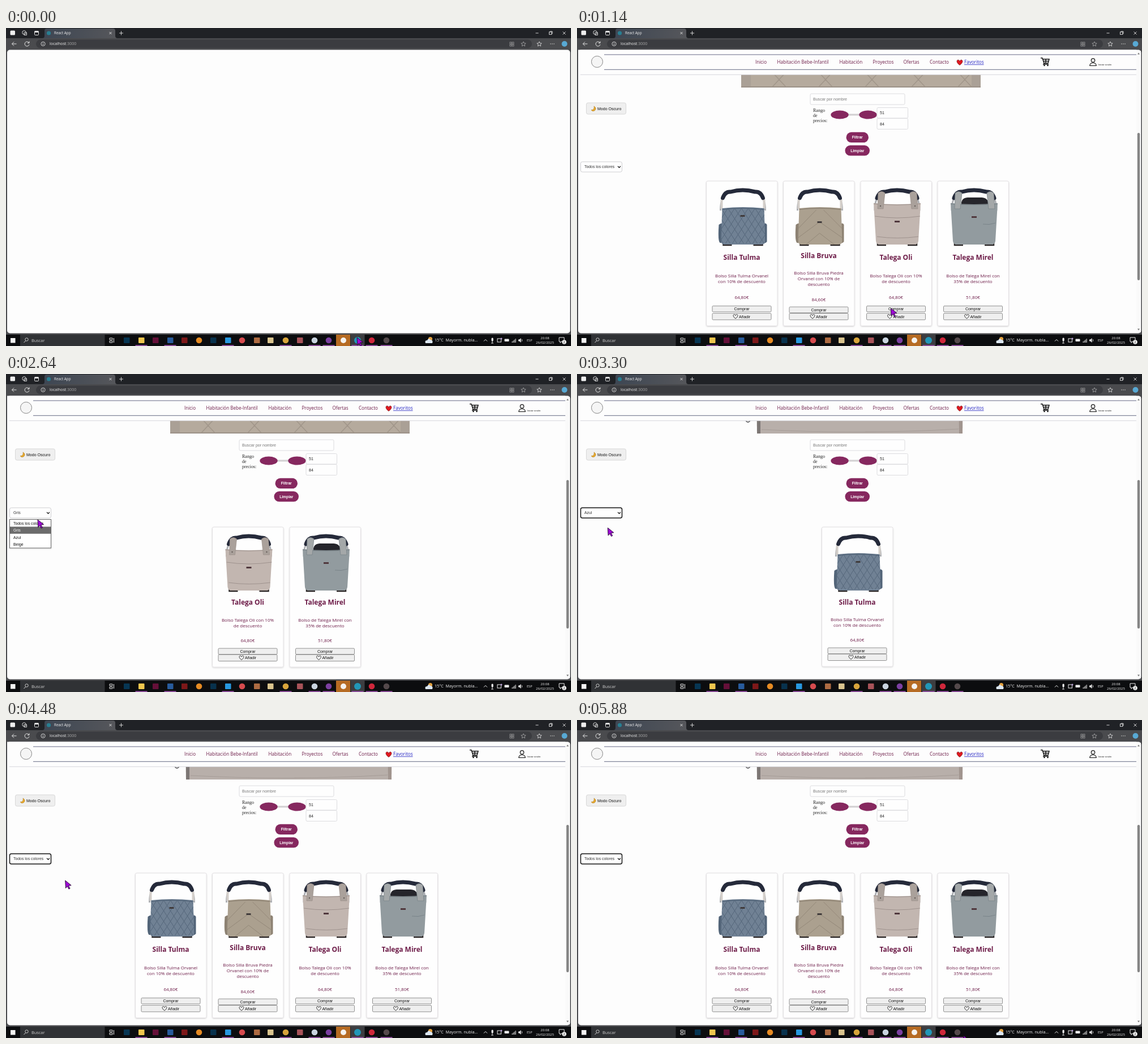
Recreate the animation shown at these times as an HTML page. Size 998x561 px, loop 5900 ms.

```html
<!DOCTYPE html>
<html lang="es">
<head>
<meta charset="utf-8">
<title>Tienda</title>
<style>
html, body { margin: 0; width: 100%; height: 100%; overflow: hidden; background: #4a4b4e; }
svg { display: block; width: 998px; height: 561px; }
text { white-space: pre; }
.shop { font-family: "Open Sans", "Noto Sans", sans-serif; fill: #6d1c48; }
.ui { font-family: "Liberation Sans", Arial, sans-serif; }
.sys { font-family: "Open Sans", "Noto Sans", sans-serif; fill: #f2f2f2; }
</style>
</head>
<body>
<svg id="stage" viewBox="0 0 998 561" xmlns="http://www.w3.org/2000/svg"></svg>
<script>
const LOOP = 5900;
const SCROLL = 263;
const PLUM = '#86285f';
const COLORS = ['Todos los colores', 'Gris', 'Azul', 'Beige'];

const rect = (x, y, w, h, fill, extra = '') =>
  `<rect x="${x}" y="${y}" width="${w}" height="${h}" fill="${fill}" ${extra}/>`;
const circle = (x, y, r, fill, extra = '') =>
  `<circle cx="${x}" cy="${y}" r="${r}" fill="${fill}" ${extra}/>`;
const line = (d, stroke, width = 1, extra = '') =>
  `<path d="${d}" fill="none" stroke="${stroke}" stroke-width="${width}" ${extra}/>`;
const shape = (d, fill, extra = '') => `<path d="${d}" fill="${fill}" ${extra}/>`;
const text = (x, y, size, value, cls, extra = '') =>
  `<text x="${x}" y="${y}" font-size="${size}" class="${cls}" ${extra}>${value}</text>`;
const MID = 'text-anchor="middle"';

const heart = (x, y, s, attrs) =>
  `<path transform="translate(${x} ${y}) scale(${s})" d="M0 4C-7-1-4-5-1.8-4Q-.5-3.5 0-2Q.5-3.5 1.8-4C4-5 7-1 0 4Z" ${attrs}/>`;

// Bags are drawn in card coordinates, 125 px wide.
function frameBar() {
  return line('M25 322Q25 298 37 292M104 322Q104 298 91 292', '#aeb0b4', 3) +
    line('M29 300Q33 288 43 289Q64 283 86 289Q96 288 100 300', '#252a3a', 7, 'stroke-linecap="round"') +
    line('M30 378V383H45M83 383H99V378', '#292424', 2.5);
}

function shoulderBag(color, dark, quilt) {
  let seams = '';
  for (let i = -3; i < 9; i++) {
    const x = 26 + i * 12;
    seams += `M${x} 318l40 62M${x + 12} 318l-40 62`;
  }
  const id = quilt ? 'quiltA' : 'quiltB';
  return frameBar() +
    line('M27 319V303M102 319V303', '#d4cfca', 4) +
    shape('M22 347Q28 342 31 347V379H24Q20 376 22 347M98 347Q105 342 107 347V377Q104 381 98 379Z', dark) +
    `<clipPath id="${id}"><path d="M28 318Q64 314 102 318L104 376Q104 382 96 382H33Q26 382 26 376Z"/></clipPath>` +
    `<g clip-path="url(#${id})">` + rect(20, 312, 90, 72, color) +
    (quilt ? line(seams, dark, .9)
      : line('M26 354L58 321M104 354L71 321M26 370L64 342L104 370M40 382L64 362L90 382', dark, .8)) + '</g>' +
    line('M28 320Q64 316 102 320', dark, 1.5) +
    rect(60, quilt ? 330 : 341, 8, 3, '#403b3b');
}

function toteBag(color, dark, hood) {
  return frameBar() +
    (hood ? shape('M42 314Q40 300 53 299H78Q91 300 90 314Z', '#25252b') : '') +
    shape('M23 309Q64 313 106 309L102 376Q101 382 95 382H34Q28 382 27 376Z', color) +
    line('M23 310Q64 314 106 310', dark, 1.2) +
    (hood ? line('M80 346Q91 348 102 344', dark, .8) : line('M25 332Q64 338 105 332M29 368Q64 373 102 368', dark, .9)) +
    shape('M31 291Q37 286 43 291L40 319H30ZM87 291Q93 286 99 291L101 319H90Z', hood ? '#a4a8a9' : '#aaa19b', `stroke="${dark}" stroke-width=".7"`) +
    (hood ? '' : circle(35, 314, 1.2, '#675e5a') + circle(96, 314, 1.2, '#675e5a')) +
    rect(60, hood ? 332 : 340, 9, 3, '#50383d');
}

const products = {
  blue: { name: 'Silla Tulma', price: '64,80€', art: shoulderBag('#708194', '#526478', true),
    lines: ['Bolso Silla Tulma Orvanel', 'con 10% de descuento'] },
  sand: { name: 'Silla Bruva', price: '84,60€', art: shoulderBag('#aba08f', '#8d8273', false),
    lines: ['Bolso Silla Bruva Piedra', 'Orvanel con 10% de', 'descuento'] },
  pale: { name: 'Talega Oli', price: '64,80€', art: toteBag('#c2b6b0', '#9a8e89', false),
    lines: ['Bolso Talega Oli con 10%', 'de descuento'] },
  gray: { name: 'Talega Mirel', price: '51,80€', art: toteBag('#929b9f', '#747f84', true),
    lines: ['Bolso de Talega Mirel con', '35% de descuento'] }
};

function cardButton(y, h, label, withHeart) {
  return rect(10.5, y, 104, h, '#efefef', 'rx="1.5" stroke="#777" stroke-width=".8"') +
    text(withHeart ? 67.5 : 62.5, y + h / 2 + 2.5, 7, label, 'ui', MID + ' fill="#111"') +
    (withHeart ? heart(51.5, y + h / 2, .9, 'fill="none" stroke="#222" stroke-width="1"') : '');
}

function card(product, x, at) {
  const { title, desc, price, buy, add, bottom } = at;
  return `<g transform="translate(${x} 0)">` +
    rect(0, 270, 125.5, bottom - 270, '#fefefe', 'rx="2.5" stroke="#e2dfe2" stroke-width="1" filter="url(#soft)"') +
    product.art +
    text(62.5, title, 12, product.name, 'shop', MID + ' font-weight="700"') +
    product.lines.map((s, i) => text(62.5, desc + i * 10, 8, s, 'shop', MID)).join('') +
    text(62.5, price, 8, product.price, 'shop', MID) +
    cardButton(buy, 10.5, 'Comprar') + cardButton(add, 11.5, 'Añadir', true) + '</g>';
}

const twoLines = { title: 409, desc: 439.5, price: 478, buy: 490.3, add: 503.3, bottom: 525.5 };
const threeLines = { title: 406.3, desc: 435.3, price: 481.5, buy: 492, add: 503.3, bottom: 525.5 };
const compact = { title: 407, desc: 436.5, price: 473, buy: 484, add: 495, bottom: 517 };
const single = { title: 406.5, desc: 436, price: 472, buy: 483, add: 494, bottom: 516 };

const lists = [
  card(products.blue, 228.5, twoLines) + card(products.sand, 364.5, threeLines) +
    card(products.pale, 501, twoLines) + card(products.gray, 637, twoLines),
  card(products.pale, 364.5, compact) + card(products.gray, 501, compact),
  card(products.blue, 432.5, single)
];

function hero() {
  let seams = '';
  for (let x = 180; x < 760; x += 82) seams += `M${x} -100L${x + 190} 105M${x + 190} -100L${x} 105`;
  return '<g id="slideA"><clipPath id="heroClip"><rect x="290" y="-160" width="423" height="265"/></clipPath>' +
    '<g clip-path="url(#heroClip)">' + rect(290, -160, 423, 265, '#b5aa9d') + line(seams, '#a1968a', 1.5) +
    rect(290, -160, 17, 265, '#aaa096') + rect(697, -160, 16, 265, '#aaa096') +
    line('M290 104H713', '#9c9288', 2) + '</g></g>' +
    '<g id="slideB">' + shape('M316 -160H682L681 105H318Z', '#b8afaa') +
    shape('M316 -160H324V105H318Z', '#7d7775') + shape('M672 -160H682L681 105H675Z', '#a1958f') +
    line('M326 98Q500 107 674 97', '#a59c97', 1.2) +
    line('M298 82Q302 88 306 82', '#6d6d70', 1.8) + '</g>';
}

function field(x, y, w, h, value, fill) {
  return rect(x, y, w, h, '#fefefe', 'rx="2" stroke="#d9d9dc" stroke-width=".9"') +
    text(x + 5, y + h / 2 + 2.6, 7.05, value, 'ui', `fill="${fill}"`);
}

function pill(x, y, w, label) {
  return rect(x, y, w, 18.3, PLUM, 'rx="9.1"') +
    text(x + w / 2, y + 11.6, 6.7, label, 'ui', MID + ' fill="#fff" font-weight="700"');
}

function filters() {
  return field(412, 116, 167, 19, 'Buscar por nombre', '#777') +
    ['Rango', 'de', 'precios:'].map((s, i) =>
      text(417, 147.5 + i * 9.3, 8, s, '', 'fill="#222" font-family="Liberation Serif, serif"')).join('') +
    line('M464 153H514', '#d2d0d2', 3) +
    [464, 514].map(x => `<ellipse cx="${x}" cy="153" rx="15.7" ry="7.6" fill="${PLUM}"/>`).join('') +
    field(530, 140.5, 54.5, 18.5, '51', '#222') + field(530, 159.5, 54.5, 19, '84', '#222') +
    pill(475.5, 183.8, 39.5, 'Filtrar') + pill(473.5, 207, 43.5, 'Limpiar') +
    rect(6.5, 236, 73, 18, '#fefefe', 'id="select" rx="3"') +
    text(13, 247.3, 6.9, '', 'ui', 'id="selectText" fill="#333"') +
    line('M72 243.8l2.5 2.5l2.5-2.5', '#222', 1.3);
}

function dropdown() {
  return '<g id="menu">' + rect(6.5, 256.5, 73, 50.5, '#fff', 'stroke="#666" stroke-width="1" filter="url(#soft)"') +
    rect(7, 257, 72, 12.4, '#6c6c6c', 'id="hover"') +
    COLORS.map((s, i) => text(13, 265.5 + i * 12.5, 6.9, s, 'ui option')).join('') + '</g>';
}

function header() {
  const links = [[315, 'Inicio'], [353.5, 'Habitación Bebe-Infantil'], [463.5, 'Habitación'],
    [522.5, 'Proyectos'], [576.5, 'Ofertas'], [623, 'Contacto']];
  return rect(2, 38.5, 986, 44, '#fdfdfd') + line('M6 82.3H988', '#d6d6dc', 1) +
    line('M48 47H988M48 73.3H988', '#656984', 1) +
    circle(35.5, 59.5, 10, '#f5f5f5', 'stroke="#777" stroke-width=".9"') +
    links.map(([x, s]) => text(x, 63.3, 8.1, s, 'shop')).join('') +
    heart(676, 61, 1.15, 'fill="#e0181f" stroke="#5b1015" stroke-width=".5"') +
    text(684, 63.3, 8.1, 'Favoritos', 'shop', 'style="fill:#2525c4;text-decoration:underline"') +
    line('M819 53H822L825 62H832L834 55H823M824 58.5H833M825 62L824 64H833M828 55V62', '#151515', 1.5) +
    circle(825.5, 66, 1.3, '#151515') + circle(831.5, 66, 1.3, '#151515') +
    circle(911.5, 57, 3.2, 'none', 'stroke="#111" stroke-width="1.2"') +
    line('M905.8 66.5Q906 61.5 911.5 61.5Q917 61.5 917.2 66.5Z', '#111', 1.2) +
    text(920.5, 65.7, 4.1, 'Iniciar sesión', 'ui', 'fill="#222"');
}

function page() {
  return rect(2, 38.5, 994.5, 500, '#fdfdfd', 'rx="5"') +
    '<g id="site"><clipPath id="view"><rect x="2" y="82" width="986" height="456.5"/></clipPath>' +
    '<g clip-path="url(#view)"><g id="content">' + hero() + filters() +
    lists.map((s, i) => `<g id="list${i}">${s}</g>`).join('') + '</g></g>' +
    rect(16.5, 132, 70, 20, '#efefef', 'rx="3" stroke="#d8d8d8" stroke-width="1"') +
    shape('M30 137.8Q36 142 31 146Q27 148 25 144.5Q31 145 30 137.8', '#e7a82d', 'stroke="#94681e" stroke-width=".4"') +
    text(36, 144.8, 7.05, 'Modo Oscuro', 'ui', 'fill="#111"') + header() +
    rect(988, 40, 8, 497, '#fafafa') +
    shape('M992 43.5l2 3h-4ZM992 533.5l2-3h-4Z', '#777') +
    rect(989.8, 185, 4.4, 260, '#858585', 'id="thumb" rx="2.2"') + dropdown() + '</g>';
}

function browser() {
  const ink = '#e4e4e4';
  return rect(0, 0, 998, 561, '#4a4b4e') + rect(0, 0, 998, 18, '#202226') +
    shape('M64 18Q68 18 68 14V5Q68 1 72 1H189Q193 1 193 5V14Q193 18 197 18Z', 'url(#tab)') +
    rect(7.5, 4.5, 8.5, 8, '#eeeeee', 'rx="1.5"') +
    line('M29 6l3-1.5l3 1.5v4l-3 1.5l-3-1.5ZM32 8h4.5v4.5h-4.5Z', ink, .9) +
    rect(50.5, 5.5, 7, 7, 'none', `rx="1" stroke="${ink}" stroke-width="1"`) + rect(50.5, 5.5, 7, 2.4, ink) +
    circle(75.5, 9, 3.6, '#287f92') + text(85, 11.2, 6.3, 'React App', 'sys') +
    line('M182.5 7l4 4m0-4l-4 4M200 9h7M203.500 5.5v7', ink, .9) +
    line('M935.500 9h5M983.500 6.500l5 5m0-5l-5 5M961 7v-1h4v4h-1', ink, .9) +
    rect(959.5, 7, 4.3, 4.3, 'none', `stroke="${ink}" stroke-width=".9"`) +
    rect(53, 20.5, 876, 15, '#3b3c40', 'rx="7.5"') +
    line('M18.500 28H10.500m3.500-3.500l-3.500 3.500l3.500 3.500', ink, 1) +
    line('M40.500 26A4 4 0 1 0 41 29M41 23.500v3h-3', ink, 1) +
    circle(65.5, 28, 3.6, 'none', `stroke="${ink}" stroke-width=".9"`) + line('M65.500 27.500v2.500M65.500 25.700v.8', ink, 1) +
    text(77, 30.4, 7, 'localhost<tspan fill="#aaa">:3000</tspan>', 'sys') +
    [[890, 25], [894, 25], [890, 29], [894, 29]].map(([x, y]) => rect(x, y, 3, 3, 'none', 'stroke="#aaa" stroke-width=".7"')).join('') +
    [914, 942].map(x => line(`M${x} 24l1.200 2.700l3 .3l-2.300 2l.7 3l-2.600-1.600l-2.600 1.600l.7-3l-2.300-2l3-.3Z`, x < 930 ? '#aaa' : ink, .8)).join('') +
    [962, 965, 968].map(x => circle(x, 28, .7, ink)).join('') + circle(986.5, 28, 5, '#58a9d4');
}

function taskbar() {
  const squares = [[213, '#073653'], [239, '#efc64e'], [264, '#651039'], [290, '#285b9c'], [315, '#7d1819'],
    [366, '#08324d'], [392, '#2798df'], [443, '#ad6b42'], [467, '#d9c48e'], [519, '#a75359']];
  const discs = [[341, '#e68b23'], [417, '#d64b4e'], [494, '#d7a43b'], [545, '#c9d3df'], [570, '#7b3fa0'],
    [646, '#cf273b'], [672, '#54494b']];
  return rect(0, 541, 998, 20, '#0c0d0f') +
    rect(8, 547, 8.5, 8.5, '#f4f4f4') + rect(25, 541, 149.5, 20, '#303235') +
    circle(36.5, 549.5, 2.7, 'none', 'stroke="#ddd" stroke-width=".9"') + line('M34.500 552l-3 3', '#ddd', 1) +
    text(45, 553.7, 7.4, 'Buscar', 'sys', 'style="fill:#cfcfcf"') +
    line('M183 547h5v3h-5ZM183 552h5v3h-5ZM190.500 547v8', '#e4e4e4', 1) +
    rect(583, 541, 25, 20, '#b66b23') + rect(608.5, 541, 25, 20, '#3c3d40') +
    squares.map(([x, c]) => rect(x - 5, 546, 10.5, 10, c, 'rx="1"')).join('') +
    discs.map(([x, c]) => circle(x, 551, 5.3, c)).join('') +
    circle(596, 551, 5, '#f5f2ee') + circle(621, 551, 6, '#2297b8') +
    [239, 290, 392, 494, 545, 570, 621, 646, 672].map(x => rect(x - 10.5, 559.3, 21, 1.7, '#9650a6')).join('') +
    circle(749.5, 548.5, 3.6, '#e3a240') + shape('M741 556Q739 551 744 551Q746 546 750 550Q755 551 753 556Z', '#dce7f2') +
    text(757, 553.4, 7.2, '15°C  Mayorm. nubla...', 'sys') +
    line('M844 552.500l3-3l3 3', '#eee', 1) + rect(857.5, 546.5, 3.2, 6, '#eee', 'rx="1.500"') + line('M859 552v4M857 556h4', '#eee', .9) +
    rect(868, 548, 6.5, 6, 'none', 'stroke="#eee"') + circle(875, 548, 1.5, '#bba1db') +
    rect(880.5, 548.5, 8, 4.5, '#eee', 'rx="1"') +
    [0, 1, 2, 3].map(i => rect(893.5 + i * 2, 553 - i * 1.6, 1.3, 2 + i * 1.6, '#bbb')).join('') +
    shape('M905 549.500h2l2.500-2.500v8l-2.500-2.500h-2Z', '#eee') + line('M911 549q1.500 2 0 4', '#eee', .8) +
    text(920, 553.2, 5.6, 'ESP', 'sys') + text(952, 548.5, 6, '20:08', 'sys', MID) +
    text(952, 557.3, 6, '26/02/2025', 'sys', MID) +
    shape('M977 546h9v7h-5l-2 2.500v-2.500h-2Z', 'none', 'stroke="#eee"') + circle(986, 554, 3.8, '#eee') +
    text(986, 556.2, 5.8, '2', 'sys', MID + ' style="fill:#222"');
}

const stage = document.getElementById('stage');
stage.innerHTML = '<defs><linearGradient id="tab"><stop stop-color="#3d4653"/><stop offset="1" stop-color="#56575b"/></linearGradient>' +
  '<filter id="soft" x="-10%" y="-10%" width="120%" height="120%"><feDropShadow dx="0" dy="1" stdDeviation="1.2" flood-opacity=".16"/></filter></defs>' +
  browser() + page() + taskbar() +
  shape('M0 0L10.500 8.500L5.700 9.100L8.400 14L6.200 15L3.700 10.100L.8 13.500Z', '#9e08d6', 'id="cursor" stroke="#24082e" stroke-width=".9"');

const el = id => document.getElementById(id);
const options = [...document.querySelectorAll('.option')];
const show = (id, on) => el(id).setAttribute('display', on ? 'inline' : 'none');
const ease = p => p * p * (3 - 2 * p);
const clamp = p => Math.max(0, Math.min(1, p));
const within = (t, a, b) => t >= a && t < b;

// Pointer tip: time, x, y
const pointer = [[0, 620, 546], [120, 620, 546], [460, 591, 513], [1080, 591, 513], [1460, 60, 244],
  [1640, 60, 246], [1840, 58, 272], [2040, 58, 272], [2380, 57, 243], [2520, 57, 244], [2640, 56, 257],
  [2820, 54, 285], [3080, 54, 285], [3660, 55, 243], [3840, 55, 244], [4060, 53, 262], [4300, 53, 262],
  [5040, 397, 403], [5880, 683, 557], [LOOP, 683, 557]];

function pointerAt(t) {
  const i = pointer.findIndex(k => k[0] > t);
  const [t0, x0, y0] = pointer[i - 1], [t1, x1, y1] = pointer[i];
  const p = ease((t - t0) / (t1 - t0));
  return [x0 + (x1 - x0) * p, y0 + (y1 - y0) * p];
}

function draw(t) {
  const [x, y] = pointerAt(t);
  const color = within(t, 1980, 2880) ? 1 : within(t, 2880, 4200) ? 2 : 0;
  const open = within(t, 1560, 1980) || within(t, 2460, 2880) || within(t, 3800, 4200);
  const focused = t >= 1980 && !open;
  const scrolled = ease(clamp((t - 220) / 200));

  show('site', t >= 100);
  el('content').setAttribute('transform', `translate(0 ${SCROLL * (1 - scrolled)})`);
  el('thumb').setAttribute('y', 48 + (color ? 139 : 137) * scrolled);
  el('thumb').setAttribute('height', color ? 262 : 260);
  show('slideA', t < 3200);
  show('slideB', t >= 3200);
  lists.forEach((_, i) => show('list' + i, i === color));

  el('select').setAttribute('stroke', focused ? '#151515' : '#cfcfd2');
  el('select').setAttribute('stroke-width', focused ? 1.5 : 1);
  el('selectText').textContent = COLORS[color];
  show('menu', open);
  const row = y < 258.5 ? color : Math.min(3, Math.floor((y - 256.5) / 12.5));
  el('hover').setAttribute('y', 257 + row * 12.4);
  options.forEach((o, i) => o.setAttribute('fill', i === row ? '#fff' : '#111'));
  el('cursor').setAttribute('transform', `translate(${x} ${y})`);
}

const start = performance.now();
function tick() {
  draw((performance.now() - start) % LOOP);
  requestAnimationFrame(tick);
}
tick();
</script>
</body>
</html>
```
